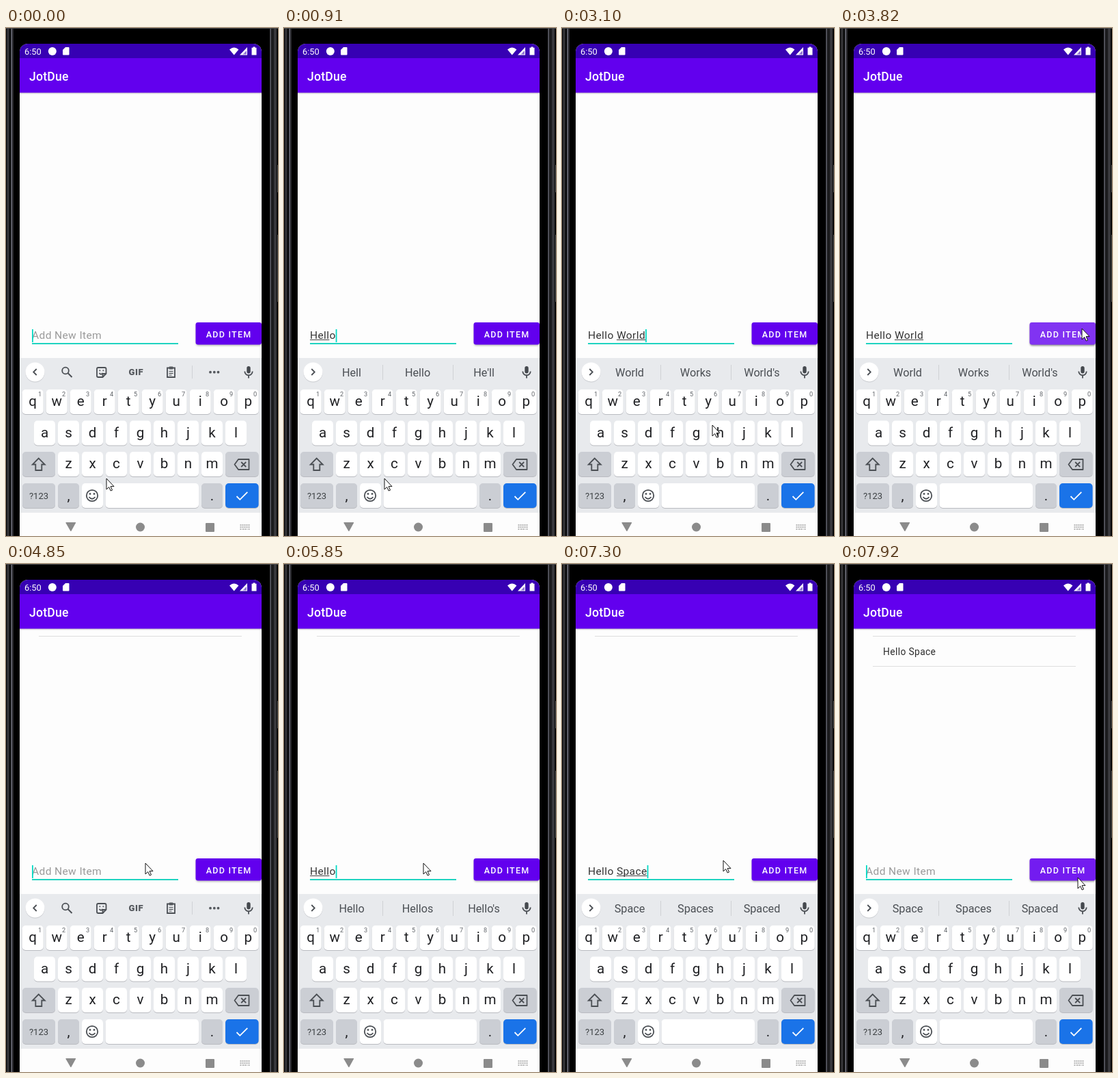
Animation of 398 by 742 pixels, one loop 8 s. Source, as an HTML page:

```html
<!DOCTYPE html>
<html lang="en">
<head>
<meta charset="utf-8">
<title>To-do list demo</title>
<style>
  html, body { margin: 0; width: 100%; height: 100%; overflow: hidden; background: #000; }
  svg { display: block; }
  text { font-family: Roboto, "Noto Sans", sans-serif; white-space: pre; }
  .field { font-size: 15.5px; letter-spacing: .4px; }
  .key { font-size: 20.6px; fill: #202124; text-anchor: middle; }
  .hint { font-size: 9.2px; fill: #5f6368; text-anchor: middle; }
  .word { font-size: 16.2px; fill: #4b4f54; text-anchor: middle; }
  .line { fill: none; stroke: #4b4f54; stroke-width: 1.8; }
</style>
</head>
<body>
<svg width="398" height="742" viewBox="0 0 398 742">
  <defs>
    <linearGradient id="fade" x2="0" y2="1">
      <stop offset="0" stop-color="#000" stop-opacity=".25"/>
      <stop offset="1" stop-color="#000" stop-opacity="0"/>
    </linearGradient>
    <filter id="blur" x="-10%" y="-20%" width="120%" height="150%"><feGaussianBlur stdDeviation="1.5"/></filter>
    <clipPath id="screen"><path d="M20 742V35a12 12 0 0 1 12-12H362a12 12 0 0 1 12 12V742Z"/></clipPath>
    <clipPath id="btnClip"><rect x="277.5" y="430" width="96.500" height="32.500" rx="3.4"/></clipPath>
  </defs>

  <rect width="398" height="742"/>
  <g id="frame">
    <rect x="1" width="4" height="742" fill="#303033"/>
    <rect x="7" width="2" height="742" fill="#5a5b64"/>
    <rect x="9" width="2" height="742" fill="#2c2c31"/>
    <rect x="386" width="2" height="742" fill="#4e4f57"/>
    <rect x="388" width="4" height="742" fill="#1b1b1d"/>
    <rect x="392" width="4" height="742" fill="#38383c"/>
    <path d="M397.500 200v40M397.500 302v98" stroke="#555"/>
  </g>
  <rect width="398" height="1" fill="#4a4a4d"/>

  <g clip-path="url(#screen)">
    <rect x="20" y="23" width="354" height="719" fill="#fdfdfd"/>
    <rect x="20" y="94" width="354" height="3" fill="url(#fade)"/>
    <rect x="20" y="44" width="354" height="50.500" fill="#6200ee"/>
    <rect x="20" y="23" width="354" height="21" fill="#3700b3"/>
    <g fill="#fff">
      <text x="27" y="38.500" font-size="12.800">6:50</text>
      <circle cx="67.800" cy="34" r="6"/>
      <path d="M87 28h4.500q1 0 1 1v9.500q0 1-1 1h-7.500q-1 0-1-1V32Z"/>
      <path d="M327 31.500q6.700-6 13.400 0L333.700 39.500Z"/>
      <path d="M342 39.500L353 28V39.500Z"/>
      <path d="M361.500 28.800v-1.300h3v1.300h2v10.700h-7V28.800Z"/>
      <text x="34" y="77" font-size="17.600" font-weight="500" letter-spacing=".2">JotDue</text>
    </g>
    <path d="M346.500 38.500L352 33V38.500Z" fill="#3700b3" opacity=".55"/>

    <rect id="rule1" x="48" y="105" width="297" height="1" fill="#dedede"/>
    <g id="item">
      <text x="63" y="133" font-size="13.800" letter-spacing=".38" fill="#2c2c2c">Hello Space</text>
      <rect x="48" y="149" width="297" height="1" fill="#dedede"/>
    </g>

    <text id="hintText" class="field" x="38" y="454" fill="#9a9a9a">Add New Item</text>
    <text id="typed" class="field" x="38" y="454" fill="#333"></text>
    <rect id="under" y="455" height="1" fill="#444"/>
    <rect x="38" y="460" width="214" height="2" fill="#1fd3c1"/>
    <rect id="caret" y="440" width="1.800" height="19" fill="#03dac5"/>

    <rect id="shade" x="278" y="432" width="96" height="32" rx="3.400" filter="url(#blur)"/>
    <g clip-path="url(#btnClip)">
      <rect x="277" y="430" width="97" height="33" fill="#6200ee"/>
      <circle id="ripple" fill="#fff"/>
    </g>
    <text x="292.800" y="451.500" font-size="12.500" font-weight="500" letter-spacing="1.240" fill="#fff">ADD ITEM</text>

    <rect x="20" y="482" width="354" height="226" fill="#e8eaed"/>
    <circle cx="42.500" cy="503.500" r="14" fill="#c9cbcf"/>
    <circle cx="42.500" cy="502.500" r="14" fill="#fff"/>
    <path id="chevron" class="line"/>

    <g id="tools">
      <g class="line">
        <circle cx="87" cy="500.500" r="4.800"/>
        <path d="M90.500 504L96.500 510" stroke-width="2"/>
        <path d="M135 496h9.500q2 0 2 2v7l-5 5h-6.500q-2 0-2-2v-10q0-2 2-2ZM146 505h-4.500v5"/>
        <path d="M136.500 504q2.500 3.500 5 0"/>
        <path d="M236 496.500h11v13.500h-11Z"/>
        <path d="M238.500 501.500h6M238.500 504.300h6M238.500 507h4" stroke-width="1.200"/>
      </g>
      <g fill="#54585d">
        <circle cx="137.300" cy="500.300" r="1"/><circle cx="142.300" cy="500.300" r="1"/>
        <rect x="238.500" y="494.500" width="6" height="4" rx="1"/>
        <text x="190.300" y="507.300" font-size="13" font-weight="900" letter-spacing=".500" text-anchor="middle">GIF</text>
        <circle cx="299" cy="502.700" r="1.900"/><circle cx="304.800" cy="502.700" r="1.900"/><circle cx="310.500" cy="502.700" r="1.900"/>
      </g>
      <rect x="272" y="493" width="1" height="19" fill="#cfd1d5"/>
    </g>
    <g id="words">
      <rect x="144" y="492" width="1" height="22" fill="#cfd1d5"/>
      <rect x="247" y="492" width="1" height="22" fill="#cfd1d5"/>
      <text class="word" x="99" y="509"></text>
      <text class="word" x="195.500" y="509"></text>
      <text class="word" x="292.500" y="509"></text>
    </g>
    <rect x="352.300" y="494" width="5.400" height="10.500" rx="2.700" fill="#45494e"/>
    <path d="M349.300 501.500a5.700 5.700 0 0 0 11.400 0M355 507.500v4" class="line"/>

    <g id="keys"></g>
    <path class="line" d="M47.800 628.500l-9 9h4.500v8.500h9v-8.500h4.500Z"/>
    <path class="line" stroke-linejoin="round" d="M334.500 637.500l5.500-7.500h15.500v15h-15.500ZM344.200 634l7 7M351.200 634l-7 7"/>
    <g class="line">
      <circle cx="126" cy="683" r="8.200"/>
      <path d="M121.500 685q4.500 5.500 9 0"/>
    </g>
    <g fill="#54585d"><circle cx="123" cy="680.500" r="1.400"/><circle cx="129" cy="680.500" r="1.400"/></g>
    <path d="M337.500 684l4.800 4.800 11-11" fill="none" stroke="#fff" stroke-width="1.800"/>

    <g fill="#8b8b8b">
      <path d="M88 722h13.500q1 0 .500 1l-6.400 11.500q-.700 1-1.400 0L87.500 723q-.500-1 .500-1Z"/>
      <circle cx="196.500" cy="729" r="6.500"/>
      <rect x="292" y="723" width="13" height="13" rx="1"/>
    </g>
    <path d="M342.500 726h14M342.500 729h14M342.500 732h2M346 732h7M354.500 732h2" stroke="#b4b4b4" stroke-width="2" stroke-dasharray="2 1"/>
  </g>

  <path id="mouse" d="M0 0V16L3.700 12.500L6.200 18L8.500 17L6.100 11.600H11Z" fill="#fff" stroke="#111" stroke-width="1"/>
</svg>

<script>
const $ = id => document.getElementById(id);
const NS = 'http://www.w3.org/2000/svg';
const set = (el, attrs) => { for (const k in attrs) el.setAttribute(k, attrs[k]); };
const show = (el, on) => { el.style.display = on ? '' : 'none'; };

function add(tag, attrs, text = '') {
  const el = document.createElementNS(NS, tag);
  set(el, attrs);
  el.textContent = text;
  $('keys').append(el);
}

function key(x, y, w, fill = '#fff') {
  add('rect', { x, y: y + 1, width: w, height: 36, rx: 5, fill: '#b9bbc0' });
  add('rect', { x, y, width: w, height: 36, rx: 5, fill });
}

[['qwertyuiop', 39.2, 528, 552], ['asdfghjkl', 56.5, 573.5, 597.5], ['zxcvbnm', 91.5, 619, 643.3]]
  .forEach(([letters, x0, top, base], row) => [...letters].forEach((ch, i) => {
    const x = x0 + 35 * i;
    key(x - 15.5, top, 31);
    add('text', { class: 'key', x, y: base }, ch);
    if (!row) add('text', { class: 'hint', x: x + 10.3, y: 538 }, String((i + 1) % 10));
  }));
const GREY = '#cbced4';
key(24, 619, 48, GREY);
key(321, 619, 48.6, GREY);
key(24, 665, 48, GREY);
key(76, 665, 31, GREY);
key(111, 665, 31);
key(145.5, 665, 136.5);
key(286, 665, 31, GREY);
key(321, 665, 48.6, '#1a73e8');
add('text', { x: 48, y: 688, 'font-size': 13, 'text-anchor': 'middle', fill: '#3c4043' }, '?123');
add('text', { class: 'key', x: 91.5, y: 690 }, ',');
add('text', { class: 'key', x: 301.5, y: 690 }, '.');

// Each step changes some of: text, u (underlined characters), caret,
// words (suggestions), mouse, press [opacity, radius], rule, item.
const steps = [
  [0, { text: '', u: [0, 0], caret: 1, words: '', mouse: [147, 658], press: [0, 0], rule: 0, item: 0 }],
  [90, { caret: 0 }],
  [370, { text: 'H', u: [0, 1], caret: 1 }],
  [550, { words: 'H He Hi' }],
  [640, { text: 'He', u: [0, 2] }],
  [730, { text: 'Hel', u: [0, 3], words: 'He Hey Hello' }],
  [820, { text: 'Hell', u: [0, 4], words: 'Hel Help Hello' }],
  [910, { text: 'Hello', words: "Hell Hello He'll" }],
  [1090, { words: "Hello Hellos Hello's" }],
  [1180, { u: [0, 5] }],
  [1370, { text: 'Hello ', u: [0, 0] }],
  [1460, { words: 'and I there' }],
  [1550, { text: 'Hello W', u: [6, 7] }],
  [1630, { text: 'Hello Wo', u: [6, 8], words: 'W We Will' }],
  [1720, { text: 'Hello Wor', u: [6, 9], words: 'Wo Would Work' }],
  [1810, { text: 'Hello Worl', u: [6, 10] }],
  [1890, { text: 'Hello World', words: 'Wor Work World' }],
  [2080, { u: [6, 11], words: 'Worl Work World' }],
  [2170, { words: "World Works World's" }],
  [2540, { caret: 0 }],
  [3010, { caret: 1, mouse: [163, 642] }],
  [3100, { mouse: [220, 580] }],
  [3190, { mouse: [284, 510] }],
  [3280, { mouse: [335, 456] }],
  [3370, { mouse: [354, 439] }],
  [3550, { caret: 0 }],
  [3640, { press: [.09, 45] }],
  [3730, { press: [.16, 80] }],
  [3820, { press: [.2, 120] }],
  [3910, { press: [.11, 120], text: '', u: [0, 0], caret: 1, rule: 1 }],
  [4000, { press: [0, 0] }],
  [4180, { mouse: [322, 440], words: '' }],
  [4280, { mouse: [236, 438] }],
  [4370, { mouse: [204, 437], caret: 0 }],
  [4850, { caret: 1 }],
  [4940, { text: 'H', u: [0, 1] }],
  [5030, { text: 'He', u: [0, 2], words: 'H He Hi' }],
  [5120, { text: 'Hel', u: [0, 3], words: 'He Hey Hello' }],
  [5210, { text: 'Hell', words: 'Hel Help Hello' }],
  [5490, { u: [0, 4], words: "Hell Hello He'll" }],
  [5670, { text: 'Hello' }],
  [5850, { words: "Hello Hellos Hello's" }],
  [5940, { u: [0, 5] }],
  [6120, { text: 'Hello ', u: [0, 0] }],
  [6210, { words: 'World and I' }],
  [6300, { text: 'Hello S', u: [6, 7] }],
  [6390, { text: 'Hello Sp', u: [6, 8], words: 'S So See' }],
  [6670, { text: 'Hello Spa', u: [6, 9], words: 'Sp Space Special' }],
  [6760, { text: 'Hello Spac', u: [6, 10] }],
  [6850, { text: 'Hello Space', words: 'Spa Space Spare' }],
  [7030, { u: [6, 11], words: 'Space Spaces Spaced' }],
  [7300, { mouse: [236, 433] }],
  [7400, { mouse: [316, 449], caret: 0 }],
  [7490, { mouse: [348, 458] }],
  [7670, { press: [.09, 45] }],
  [7760, { press: [.16, 80] }],
  [7840, { press: [.2, 120] }],
  [7920, { press: [.11, 120], text: '', u: [0, 0], caret: 1, item: 1 }],
];
const LOOP = 8000;
const slots = $('words').querySelectorAll('text');
const typed = $('typed');

function draw(s) {
  typed.textContent = s.text;
  show($('hintText'), !s.text);
  const width = n => n ? typed.getSubStringLength(0, n) : 0;
  const [a, b] = s.u;
  set($('under'), { x: 38 + width(a), width: width(b) - width(a) });
  set($('caret'), { x: 38 + width(s.text.length) });
  show($('caret'), s.caret);

  show($('tools'), !s.words);
  show($('words'), s.words);
  const words = s.words.split(' ');
  slots.forEach((el, i) => { el.textContent = words[i] || ''; });
  set($('chevron'), { d: s.words ? 'M40.300 498l4.500 4.500-4.500 4.500' : 'M44.700 498l-4.500 4.500 4.500 4.500' });

  const [alpha, r] = s.press;
  set($('ripple'), { cx: s.mouse[0], cy: s.mouse[1], r, opacity: alpha });
  set($('shade'), { opacity: .28 + alpha });
  set($('mouse'), { transform: `translate(${s.mouse})` });
  show($('rule1'), s.rule);
  show($('item'), s.item);
}

let last = -1;
function tick() {
  const t = performance.now() % LOOP;
  const n = steps.filter(([at]) => at <= t).length;
  if (n !== last) {
    draw(Object.assign({}, ...steps.slice(0, n).map(([, change]) => change)));
    last = n;
  }
  requestAnimationFrame(tick);
}
tick();
</script>
</body>
</html>
```
